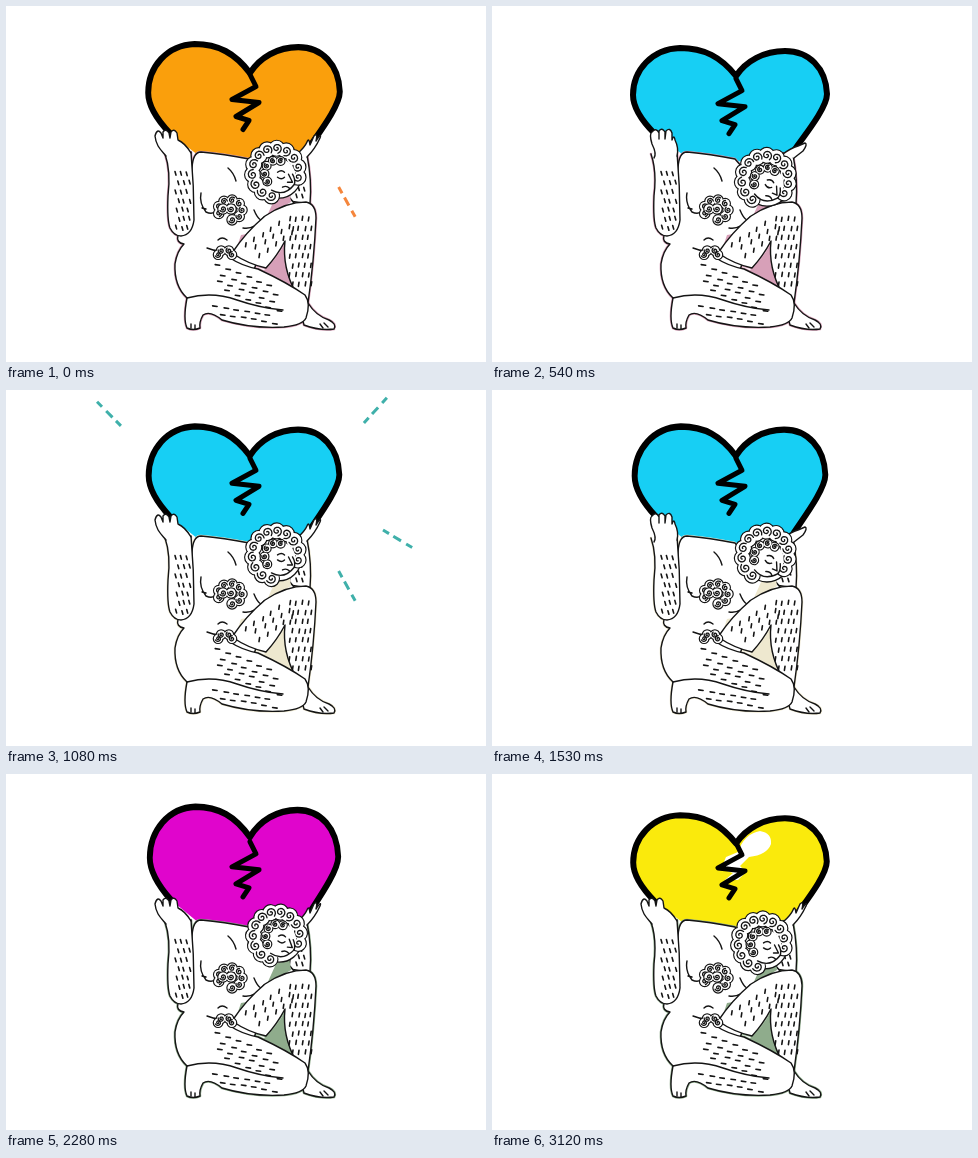
An HTML page for the animation above (3.15 s loop, 480 by 356 pixels).

```html
<!DOCTYPE html>
<html lang="en">
<head>
<meta charset="utf-8">
<title>Carrying a broken heart</title>
<style>
html, body { margin: 0; width: 100%; height: 100%; overflow: hidden; background: #fff; }
svg { display: block; width: 100vw; height: 100vh; }
</style>
</head>
<body>
<svg id="stage" viewBox="0 0 480 356" fill="none" stroke-linecap="round" stroke-linejoin="round"></svg>
<script>
const LOOP = 3150, BEAT = 1050, BURST_START = 870;
const RAD = Math.PI / 180;
const heartColors = ['#fa9f0c', '#17cff4', '#e005cc', '#faea0c'];
const rayColors = ['#3fb0aa', '#c61f83', '#f5863c'];
const tints = ['#d7a0b8', '#eee8cf', '#8fac8c'];

const stage = document.getElementById('stage');
const path = (d, attrs = '') => `<path d="${d}" ${attrs}/>`;
const solid = d => path(d, 'fill="#fff"');
const clamp = v => Math.min(1, Math.max(0, v));

let seed = 7;
const jitter = size => ((seed = seed * 16807 % 2147483647) / 2147483647 - 0.5) * size;

// A loose grid of short hair strokes spanned by the steps u and v.
function hairs(x, y, u, v, nu, nv, stroke) {
  let d = '';
  for (let j = 0; j < nv; j++) for (let i = 0; i < nu; i++) {
    const a = i + (j % 2) * 0.45;
    const px = x + a * u[0] + j * v[0] + jitter(1.5);
    const py = y + a * u[1] + j * v[1] + jitter(1.5);
    d += `M${px.toFixed(1)} ${py.toFixed(1)}l${stroke}`;
  }
  return path(d, 'stroke-width="1.6"');
}

function spiral(cx, cy, r, start) {
  let d = '';
  for (let i = 0; i <= 18; i++) {
    const a = start + i * 0.5, q = r * (0.15 + 0.85 * i / 18);
    d += `${i ? 'L' : 'M'}${(cx + q * Math.cos(a)).toFixed(1)} ${(cy + q * Math.sin(a)).toFixed(1)}`;
  }
  return path(d, 'stroke-width="1.3"');
}

// Curls along an elliptic arc, merged into one scalloped outline.
function curls(cx, cy, rx, ry, from, to, n, r) {
  const points = Array.from({ length: n }, (_, i) => {
    const a = (from + (to - from) * i / (n - 1)) * RAD;
    return [cx + rx * Math.cos(a), cy + ry * Math.sin(a)];
  });
  const dots = (radius, attrs) => points.map(([x, y]) =>
    `<circle cx="${x}" cy="${y}" r="${radius}" fill="#fff" ${attrs}/>`).join('');
  return dots(r, 'stroke-width="1.6"') + dots(r - 0.4, 'stroke="none"') +
    points.map(([x, y], i) => spiral(x, y, r * 0.66, i * 0.7)).join('');
}

const torso = 'M186 162Q187 146 195 146Q218 148 243 153L270 184Q282 188 288 197L236 242L250 258L236 300L181 292Q168 280 169 258Q171 245 178 238Q170 237 172 229L187 214Z';
const frontLeg = 'M226 247Q240 226 259 210Q280 196 300 196Q310 198 310 212Q308 255 302 297Q310 310 323 314Q331 318 328 323Q314 325 298 319L290 287Q276 262 279 235Q271 250 260 262Q242 258 226 247Z';
const backLeg = 'M224 252Q236 260 252 263Q282 277 299 289Q305 297 300 312Q297 319 278 321Q246 323 216 314Q204 304 197 309Q193 316 194 322Q187 325 181 322Q177 313 181 292';
const leftArm = 'M159 148Q165 165 162 190Q161 214 164 222Q168 230 175 230Q186 229 188 214Q188 180 185 146';
const rightArm = 'M285 176L283 195L304 198Q306 174 301 149L291 147';
const limbs = [torso, frontLeg, backLeg, leftArm, rightArm];

const openHand = 'M160 150C155 144 150 140 149 130Q151 122 155 127L157 132L157 126Q160 122 163 127L164 132L165 126Q168 122 171 127L172 134Q179 137 185 147';
const closedHand = 'M162 152Q165 148 160 138Q157 128 160 126Q164 121 167 127L167 133L167 125Q170 121 173 126L173 133L174 125Q178 121 180 127L180 134Q182 128 183 134Q187 142 185 150';
const openRight = 'M291 148Q299 141 301 136Q303 131 304 139L308 130Q312 126 310 135Q316 126 314 132Q309 143 301 151';
const closedRight = 'M291 148Q299 142 306 140L313 137Q316 138 311 145L302 152';

const head =
  `<circle cx="3" cy="3" r="23" fill="#fff" stroke-width="1.3"/>` +
  curls(0, 0, 23, 24, 100, 372, 12, 7.8) +
  `<ellipse cx="4" cy="4" rx="16" ry="17" fill="#fff" stroke="none"/>` +
  curls(1, 1, 12, 13, 140, 290, 5, 4.2) +
  path('M-4 18Q9 25 19 12Q20 7 17 2M2 0q4 -3 7 0M2 5q4 3 7 0M13 2l4 8l-5 0M7 15q4 -2 7 1', 'stroke-width="1.4"');

stage.innerHTML = `
<g id="heart">
  <path id="fill" d="M244 70C226 42 207 42 188 42C160 43 141 64 141 89C141 105 157 122 163 128L190 148Q220 159 252 155L302 144C312 130 335 102 335 88C334 62 317 45 293 45C272 45 254 55 244 70Z"/>
  <path d="M163 128C157 122 141 105 141 89C141 64 160 43 188 42C212 42 229 51 244 70C254 55 272 45 293 45C317 45 334 62 335 88C335 102 312 130 303 143" stroke="#000" stroke-width="6"/>
</g>
<g id="crack">
  <path id="shine" d="M246 78Q252 60 268 57Q280 59 279 70Q275 81 257 83L248 92L254 98L246 106L233 106L241 99L229 95L234 83Z" fill="#fff"/>
  <path d="M244 69L250 81L226 94L253 97L230 111L243 115L237 124" stroke="#000" stroke-width="5"/>
</g>
<g id="fringe" stroke-width="2.6">${limbs.map(d => path(d)).join('')}</g>
<g stroke="#141414" stroke-width="1.4">
  ${solid(rightArm)}
  <g class="open">${solid(openRight)}</g>
  <g class="closed">${solid(closedRight)}</g>
  ${hairs(289, 174, [6, 0], [0.3, 7], 2, 3, '1 3.5')}
  ${solid(torso)}
  <g id="gaps" stroke="none">
    ${path('M260 212L270 190L283 183L285 196Z')}
    ${path('M256 266Q272 252 279 237Q275 258 287 283Z')}
    ${path('M232 238L235 229L241 228Z')}
  </g>
  ${path('M195 187Q193 197 200 206Q206 209 211 205M196 202l4 1M222 162q6 5 8 13M237 222Q249 224 258 211M248 204Q254 219 262 213M212 234q4 -4 9 0M201 242q10 4 16 2')}
  ${solid(frontLeg)}
  ${hairs(284, 211, [6.2, 0], [0, 9.3], 4, 8, '-0.6 4')}
  ${hairs(240, 237, [8.5, -5.4], [6.5, 5], 5, 3, '-0.6 4')}
  ${solid(backLeg)}
  ${path('M181 292Q206 285 231 294Q254 302 277 304M185 318v4M189 319v4M318 317l4 4M314 318l3 4')}
  ${hairs(209, 259, [10.5, 4], [1.5, 8], 6, 4, '4.5 0.6')}
  ${hairs(207, 300, [10.5, 1.8], [2, 7], 6, 2, '4.5 0.6')}
  ${curls(219, 248, 7, 4, 170, 370, 4, 4.6)}
  ${curls(224, 204, 12, 10, 80, -200, 8, 5)}
  ${curls(221, 203, 4, 2, 180, 0, 2, 5)}
  ${solid(leftArm)}
  <g class="open">${solid(openHand)}</g>
  <g class="closed">${solid(closedHand)}</g>
  ${hairs(169, 166, [5.5, 0], [0.2, 9], 3, 7, '1 3.6')}
  <g id="head">${head}</g>
</g>
<g id="rays" stroke-width="3" stroke-linecap="butt"></g>`;

const el = {};
stage.querySelectorAll('[id]').forEach(node => el[node.id] = node);
const hands = stage.querySelectorAll('.open, .closed');

// Rays leave an ellipse around the heart along its normals.
function drawRays(time) {
  const since = (time - BURST_START + LOOP) % LOOP;
  const burst = Math.floor(since / BEAT), age = since % BEAT;
  const grow = clamp(age / 60), fade = clamp((age - 110) / 70);
  let out = '';
  for (let i = 0; i < 11; i++) {
    const flies = i === 0 || (burst === 0 && (i & (i + 1)) === 0);
    const late = burst === 2 && (i > 0 || time > BURST_START);
    if (late || (i === 1 && !flies) || age > (flies ? 270 : 190)) continue;
    const a = (49 - 28 * i) * RAD, rx = 125, ry = 80;
    const x = 238 + rx * Math.cos(a), y = 98 + ry * Math.sin(a);
    const normal = Math.atan2(Math.sin(a) / ry, Math.cos(a) / rx);
    const drift = flies ? fade * 26 : 0;
    const from = flies ? drift : fade * 25;
    const to = 25 * grow + drift * 1.4;
    const at = r => `${x + r * Math.cos(normal)} ${y + r * Math.sin(normal)}`;
    out += path(`M${at(from)}L${at(to)}`, fade > 0 ? 'stroke-dasharray="7 5 9 6"' : '');
  }
  el.rays.innerHTML = out;
  el.rays.setAttribute('stroke', rayColors[burst]);
}

const show = (node, on) => node.setAttribute('visibility', on ? 'visible' : 'hidden');

function render(time) {
  const phase = time % BEAT;
  const push = clamp(((phase + 30) % BEAT) / 570);
  const lift = 10 * Math.sqrt(Math.max(0, Math.sin(Math.PI * push)));
  const turn = (1 - Math.cos(2 * Math.PI * phase / BEAT)) / 2;
  const drop = 5 * Math.exp(-(((phase - 555) / 25) ** 2));

  el.heart.setAttribute('transform',
    `translate(238 150) scale(${1 - lift * 0.003} ${1 + lift / 111}) translate(-238 -150)`);
  el.crack.setAttribute('transform', `translate(0 ${drop - lift * 0.12})`);
  el.head.setAttribute('transform',
    `translate(${269.5 + turn * 4} ${169.5 - lift * 0.8 + drop}) rotate(${24 * turn})`);

  const colorIndex = Math.floor((time + BEAT / 2) / BEAT);
  const tint = tints[Math.floor(time / BEAT)];
  el.fill.setAttribute('fill', heartColors[colorIndex]);
  show(el.shine, colorIndex === 3);
  el.fringe.setAttribute('stroke', tint);
  el.gaps.setAttribute('fill', tint);

  const pose = turn > 0.5 ? 'closed' : 'open';
  hands.forEach(hand => show(hand, hand.classList.contains(pose)));
  drawRays(time);
}

const began = performance.now();
function tick() {
  render((performance.now() - began) % LOOP);
  requestAnimationFrame(tick);
}
tick();
</script>
</body>
</html>
```
